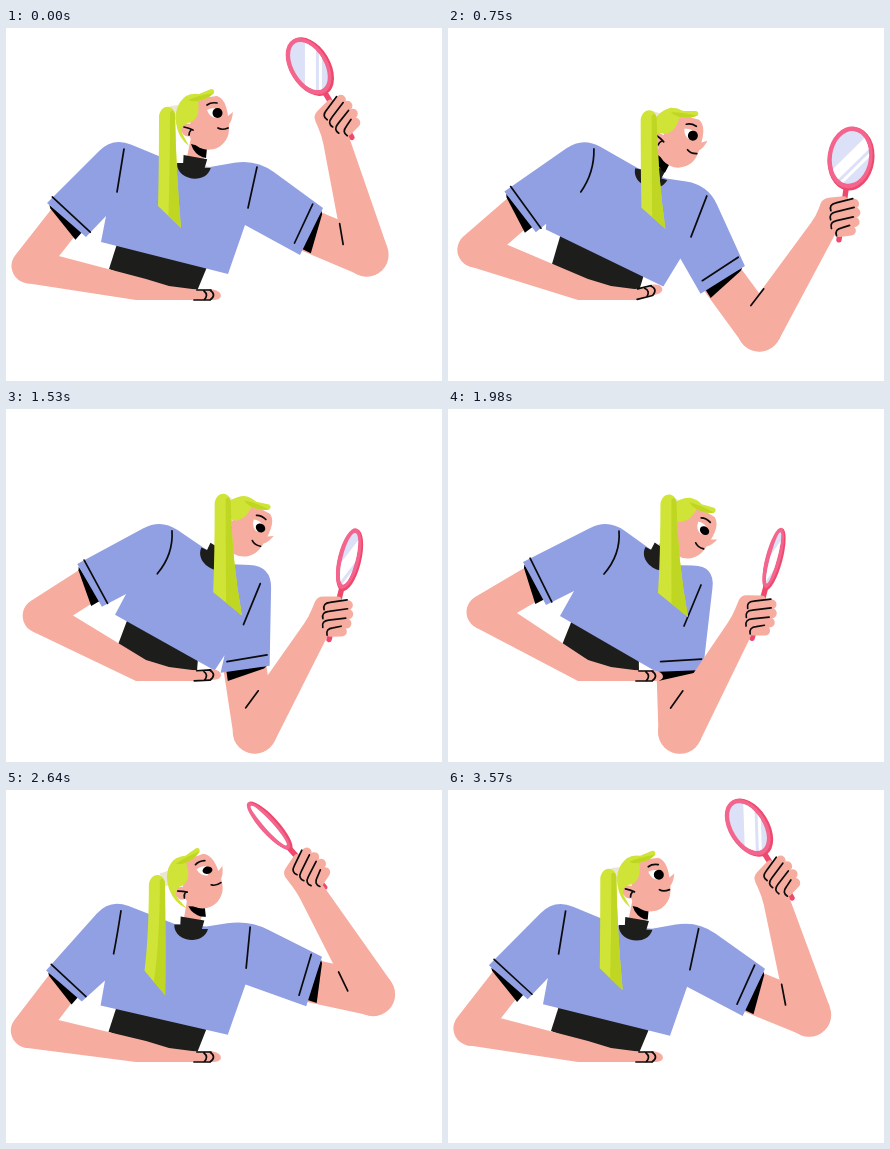
Write an HTML page that moves like this. It is 436x353 px and loops after 3.6 s.

```html
<!DOCTYPE html>
<html lang="en">
<head>
<meta charset="utf-8">
<title>Woman with a hand mirror</title>
<style>
html, body { margin: 0; width: 100%; height: 100%; overflow: hidden; background: #fff; }
svg { display: block; width: 100vw; height: 100vh; }
.skin { fill: #f7aca0; }
.limb { fill: none; stroke: #f7aca0; stroke-linecap: round; }
.blue { fill: #919fe3; }
.dark { fill: #1d1d1b; }
.black { fill: #000; }
.lime { fill: #d0e438; }
.moss { fill: #bfd622; }
.pink { fill: #f4658e; }
.rose { fill: #ee486d; }
.line { fill: none; stroke: #0b0b0b; stroke-width: 1.7; stroke-linecap: round; stroke-linejoin: round; }
</style>
</head>
<body>
<svg id="stage" viewBox="0 0 436 353"></svg>
<script>
const LOOP = 3600, STEP = 30;
const stage = document.getElementById('stage');

// time, pose, and optionally a second pose with its share
const KEYS = [[0, 0], [480, 1], [750, 2, 1, .06], [1140, 2], [1620, 3, 2, .1],
  [1980, 3], [2340, 4], [2700, 5, 4, .03], [3060, 5]];
const N = KEYS.length;
const keyTime = i => KEYS[(i + N) % N][0] + Math.floor(i / N) * LOOP;

// periodic monotone cubic through the six poses
function track(...poses) {
  const v = KEYS.map(([, a, b = a, k = 0]) => poses[a] + k * (poses[b] - poses[a]));
  const val = i => v[(i + N) % N];
  const rate = i => (val(i + 1) - val(i)) / (keyTime(i + 1) - keyTime(i));
  const slope = i => {
    const a = rate(i - 1), b = rate(i);
    return a * b > 0 ? 2 * a * b / (a + b) : 0;
  };
  return t => {
    let i = N - 1;
    while (keyTime(i) > t) i--;
    const h = keyTime(i + 1) - keyTime(i), s = (t - keyTime(i)) / h;
    const e = s * s * (3 - 2 * s);
    return val(i) * (1 - e) + val(i + 1) * e
      + h * s * (1 - s) * ((1 - s) * slope(i) - s * slope(i + 1));
  };
}
function path2(xs, ys) {
  const x = track(...xs), y = track(...ys);
  return t => [x(t), y(t)];
}

const pose = {
  shoulderL: path2([107, 118, 136, 160, 126, 102], [109, 108, 109, 110, 107, 109]),
  cuffLa: path2([41, 46, 57, 75, 52, 39], [175, 170, 163, 153, 165, 182]),
  cuffLb: path2([80, 85, 88, 98, 84, 75], [209, 207, 204, 196, 205, 212]),
  pitL: path2([100, 101, 98, 126, 110, 98], [188, 190, 196, 182, 186, 191]),
  hemL: path2([95, 95, 98, 112, 101, 94], [214, 210, 201, 207, 211, 216]),
  hemR: path2([222, 220, 215, 207, 219, 222], [246, 251, 259, 262, 252, 244]),
  pitR: path2([239, 238, 232, 215, 233, 240], [197, 209, 232, 250, 212, 193]),
  cuffRb: path2([294, 277, 251, 205, 268, 303], [227, 246, 267, 263, 247, 213]),
  cuffRa: path2([317, 311, 296, 255, 303, 317], [180, 207, 240, 261, 208, 163]),
  shoulderR: path2([250, 261, 260, 267, 254, 242], [131, 140, 158, 157, 141, 129]),
  neckR: path2([204, 205, 219, 222, 207, 200], [139, 143, 151, 156, 143, 136]),
  neckL: path2([172, 182, 190, 202, 184, 168], [136, 138, 140, 140, 137, 134]),
  waist: path2([103, 103, 104, 114, 108, 102], [241, 240, 236, 236, 238, 242]),
  elbowL: path2([23, 24, 27, 36, 26, 22], [238, 233, 221, 203, 225, 242]),
  collar: path2([188, 195, 204, 212, 198, 184], [137, 140, 146, 147, 140, 136]),
  head: path2([203, 213, 232, 240, 214.5, 195], [101, 105, 120, 129, 106, 97]),
  tail: path2([175, 176, 220, 240, 217, 153], [200, 196, 201, 208, 199, 206]),
  tailSide: path2([152, 153, 196, 210, 175, 135], [178, 174, 180, 184, 178, 181]),
  foldR: path2([251, 256, 259, 253, 246, 244], [139, 151, 169, 176, 151, 136]),
  foldRun: track(-9, -13, -16, -17, -4, -4),
  bow: track(0, 3, 8, 10, 5, 0),
  collarTurn: track(10, 14, 22, 35, 15, 9),
  headTurn: track(0, 4, 24, 38, 6, -14),
  pupil: track(5, 5, 5, 4, 4.6, 3.6),
  swing: track(73.3, 54.6, 31.9, -2.6, 51.7, 86.5),
  reach: track(128, 128, 134, 133, 121, 131),
  forearm: track(-15, 3.5, 34, 30, -5.5, -33.5),
  mirror: track(-31, -17, 9.5, 15, -21.5, -44),
  mirrorWidth: track(20, 21.4, 23.4, 8.3, 7, 9),
  shine: track(0, 22, 47, 35, -10, -40),
  palmTilt: track(0, 0, -15, 0, 0, 0)
};

function el(tag, cls, attrs = {}, parent = stage) {
  const e = document.createElementNS('http://www.w3.org/2000/svg', tag);
  if (cls) e.setAttribute('class', cls);
  set(e, attrs);
  return parent.appendChild(e);
}
function set(e, attrs) {
  for (const k in attrs) e.setAttribute(k, attrs[k]);
}
const draw = (cls, d, parent) => el('path', cls, d ? { d } : {}, parent);
const group = () => el('g');

const rad = a => a * Math.PI / 180;
const add = (p, q, k = 1) => [p[0] + q[0] * k, p[1] + q[1] * k];
const mix = (p, q, k) => [p[0] + (q[0] - p[0]) * k, p[1] + (q[1] - p[1]) * k];
const unit = (p, q) => {
  const l = Math.hypot(q[0] - p[0], q[1] - p[1]) || 1;
  return [(q[0] - p[0]) / l, (q[1] - p[1]) / l];
};
function place(o, turn, x, y) {
  const c = Math.cos(rad(turn)), s = Math.sin(rad(turn));
  return [o[0] + x * c - y * s, o[1] + x * s + y * c];
}
const f = p => p[0].toFixed(2) + ',' + p[1].toFixed(2);
const seg = (p, q) => 'M' + f(p) + 'L' + f(q);
const at = (p, turn) => `translate(${f(p)}) rotate(${turn.toFixed(2)})`;

// closed polygon; a third number on a point rounds that corner
function poly(...pts) {
  return pts.map((p, i) => {
    const a = pts[(i + pts.length - 1) % pts.length], b = pts[(i + 1) % pts.length];
    const cmd = i ? 'L' : 'M';
    if (!p[2]) return cmd + f(p);
    return cmd + f(add(p, unit(p, a), p[2])) + 'Q' + f(p) + ' ' + f(add(p, unit(p, b), p[2]));
  }).join('') + 'Z';
}
const soft = (p, r) => [p[0], p[1], r];

// layers, back to front
const vest = draw('dark');
const upperL = draw('limb'), upperR = draw('limb');
const cuffL = draw('black'), cuffR = draw('black');
const shirt = draw('blue');
const seams = draw('line');
const neck = draw('limb');
set(upperL, { 'stroke-width': 35 });
set(upperR, { 'stroke-width': 43 });
set(neck, { 'stroke-width': 17, 'stroke-linecap': 'butt' });

const collar = group();
draw('dark', 'M-12,-8L12,-8L11,1L17,0C15,18 -15,18 -17,1L-11,0Z', collar);

const head = group();
draw('black', 'M-18,15L-2,19L-3,29Q-11,28 -16,20Z', head);
draw('skin', 'M-16,-30L8,-33Q17,-30 19,-13L24,-17Q23,-8 20,-5L20,1A20.3,20.6 0 0 1 -20,5Z', head);
draw('', 'M-39,-23L-29,-24L-31,-10L-36,-9Z', head).setAttribute('fill', '#ece5d6');
draw('lime', 'M-33,-6Q-35,-24 -23,-33Q-17,-36 -10,-35L2,-40Q6,-40 5,-36Q-3,-29 -11,-28Q-9,-16 -14,-10Q-17,-6 -22,-6L-27,4L-20,17Q-31,9 -33,-6Z', head);
draw('moss', 'M-21,-29Q-10,-34 5,-36Q-1,-30 -11,-28Q-16,-27 -21,-29Z', head);
el('circle', 'skin', { cx: -21, cy: 1, r: 6.5 }, head);
draw('line', 'M-25,-2Q-20,-1 -16,1M-18,1Q-20,3 -20,6', head);
draw('', 'M-2,-19Q3,-22 8,-20L8,-11Q1,-11 -2,-19Z', head).setAttribute('fill', '#fff');
const pupil = el('ellipse', 'black', { cx: 8.5, cy: -16, rx: 5 }, head);
draw('line', 'M-2,-24Q2,-27 8,-26M9,-1Q13,1.5 19,-1', head);

const tail = draw('lime'), tailShade = draw('moss');

const mirror = group();
const clip = el('clipPath', '', { id: 'glass' }, mirror);
const clipShape = el('ellipse', '', { ry: 26.5 }, clip);
const handle = { x: -2.7, width: 5.4, rx: 2.7 };
el('rect', 'rose', { ...handle, y: -30, height: 58.5 }, mirror);
const rim = el('ellipse', 'rose', { cx: .8, cy: -56.3, ry: 32 }, mirror);
const frame = el('ellipse', 'pink', { cx: -.4, cy: -57.5, ry: 31 }, mirror);
const glass = el('ellipse', '', { cy: -57.5, ry: 26.5, fill: '#dce1f7' }, mirror);
const shineBox = el('g', '', { 'clip-path': 'url(#glass)' }, mirror);
const shine = el('g', '', { fill: '#fff' }, shineBox);
el('rect', '', { x: -4, y: -45, width: 11, height: 90 }, shine);
el('rect', '', { x: 10, y: -45, width: 3, height: 90 }, shine);

const lowerR = draw('skin'), elbowR = el('circle', 'skin', { r: 22 });
const crease = draw('line');

const fist = group();
const FINGERS = [[-10, -6, 10, -12], [-9, 3, 12.5, -3.5], [-7, 11.5, 13, 6], [-1, 18, 10.5, 15]];
FINGERS.forEach(([x, y, u, v]) =>
  set(draw('limb', `M${x},${y}L${u},${v}`, fist), { 'stroke-width': 10 }));
FINGERS.forEach(([x, y, u, v]) =>
  draw('line', `M${u - 2},${v - 5}L${x + 2},${y - 4.5}Q${x - 5},${y - 2} ${x - 2},${y + 4}`, fist));

const lowerL = draw('skin');
const palm = group();
draw('skin', 'M184,261.5H207Q215,263 215,268Q214,272 207,272H184Z', palm);
draw('line', 'M191,262H205M188,272H203M198,263Q203,267 198,272M204,262Q211,267 204,272', palm);

// dark sleeve lining that widens towards the underside
function lining(a, b, n) {
  const end = mix(a, b, .88);
  return poly(mix(a, b, .06), add(mix(a, b, .12), n, 2), add(end, n, 9), add(end, n, -3));
}

function render(t) {
  const p = {};
  for (const k in pose) p[k] = pose[k](t);

  // torso
  const hem = k => mix(p.hemL, p.hemR, k);
  set(vest, { d: poly(add(hem(.13), [0, -4]), p.waist, [160, 263], [191, 263], hem(.83), add(hem(.8), [0, -6])) });
  set(shirt, { d: poly(soft(p.shoulderL, 20), p.cuffLa, p.cuffLb, p.pitL, p.hemL, p.hemR, p.pitR,
    p.cuffRb, p.cuffRa, soft(p.shoulderR, 22), p.neckR, p.neckL) });

  const dl = unit(p.cuffLa, p.cuffLb), nl = [-dl[1], dl[0]];
  const dr = unit(p.cuffRa, p.cuffRb), nr = [dr[1], -dr[0]];
  set(cuffL, { d: lining(p.cuffLa, p.cuffLb, nl) });
  set(cuffR, { d: lining(p.cuffRa, p.cuffRb, nr) });

  const fold = add(p.shoulderL, [11, 12]), foldEnd = add(p.shoulderL, [4 - p.bow * .8, 55]);
  const bend = add(mix(fold, foldEnd, .55), [p.bow, 0]);
  const ra = add(p.cuffRa, nr, -11), rb = add(p.cuffRb, nr, -10);
  set(seams, { d: seg(add(p.cuffLa, nl, -8), add(p.cuffLb, nl, -6.5))
    + seg(mix(ra, rb, .02), mix(ra, rb, .84))
    + 'M' + f(fold) + 'Q' + f(bend) + ' ' + f(foldEnd)
    + seg(p.foldR, add(p.foldR, [p.foldRun, 41])) });

  // resting arm
  const e = p.elbowL, d = unit(e, [150, 262]), n = [-d[1], d[0]];
  set(upperL, { d: seg(add(mix(p.cuffLa, p.cuffLb, .48), nl, 1), e) });
  set(lowerL, { d: poly(add(e, n, 17.4), [130, 272], [190, 272], [190, 261.5], [163, 258], [140, 251], add(e, n, -17.4)) });
  set(palm, { transform: `rotate(${p.palmTilt.toFixed(2)} 186 267)` });

  // raised arm
  const s = rad(p.swing);
  const er = [238 + p.reach * Math.sin(s), 190 + p.reach * Math.cos(s)];
  const arm = (x, y) => place(er, p.forearm, x, -y);
  const hand = arm(9, 142);
  const fistAt = (x, y) => place(hand, p.mirror, x, y);
  set(upperR, { d: seg(mix(p.cuffRa, p.cuffRb, .5), er), 'stroke-linecap': 'butt' });
  set(elbowR, { cx: er[0].toFixed(2), cy: er[1].toFixed(2) });
  set(lowerR, { d: poly(arm(-21.7, 3), soft(arm(-12.5, 126), 8), soft(fistAt(-22, -13), 6),
    soft(fistAt(2, -19), 4), fistAt(8, 10), arm(13, 126), arm(21.9, 2)) });
  set(crease, { d: seg(arm(-18, 37), arm(-20, 16)) });
  set(fist, { transform: at(hand, p.mirror) });

  // mirror
  const w = p.mirrorWidth, lens = Math.max(2, w - 4.8).toFixed(2);
  set(mirror, { transform: at(hand, p.mirror) });
  set(rim, { rx: w.toFixed(2) });
  set(frame, { rx: (w - .8).toFixed(2) });
  set(glass, { rx: lens });
  set(clipShape, { rx: lens, cy: -57.5 });
  set(shine, { transform: at([0, -57.5], p.shine - p.mirror) });

  // head and hair
  set(collar, { transform: at(p.collar, p.collarTurn) });
  set(neck, { d: seg(p.collar, place(p.head, p.headTurn, -10, 12)) });
  set(head, { transform: at(p.head, p.headTurn) });
  set(pupil, { ry: p.pupil.toFixed(2) });
  const root = place(p.head, p.headTurn, -42, -22);
  const r = (x, y) => f(add(root, [x, y]));
  const tip = f(p.tail), side = f(p.tailSide);
  const back = `Q${r(9, 65)} ${tip}`;
  set(tail, { d: `M${side}Q${r(-8, 60)} ${r(-8, 9)}C${r(-6, -3)} ${r(6, -3)} ${r(8, 7)}${back}Z` });
  set(tailShade, { d: `M${r(3, 5)}Q${r(6, 1)} ${r(8, 7)}${back}L${f(mix(p.tailSide, p.tail, .45))}Q${r(3, 65)} ${r(3, 5)}Z` });
}

function tick() {
  const t = performance.now() % LOOP;
  render(Math.floor(t / STEP) * STEP);
  requestAnimationFrame(tick);
}
tick();
</script>
</body>
</html>
```
